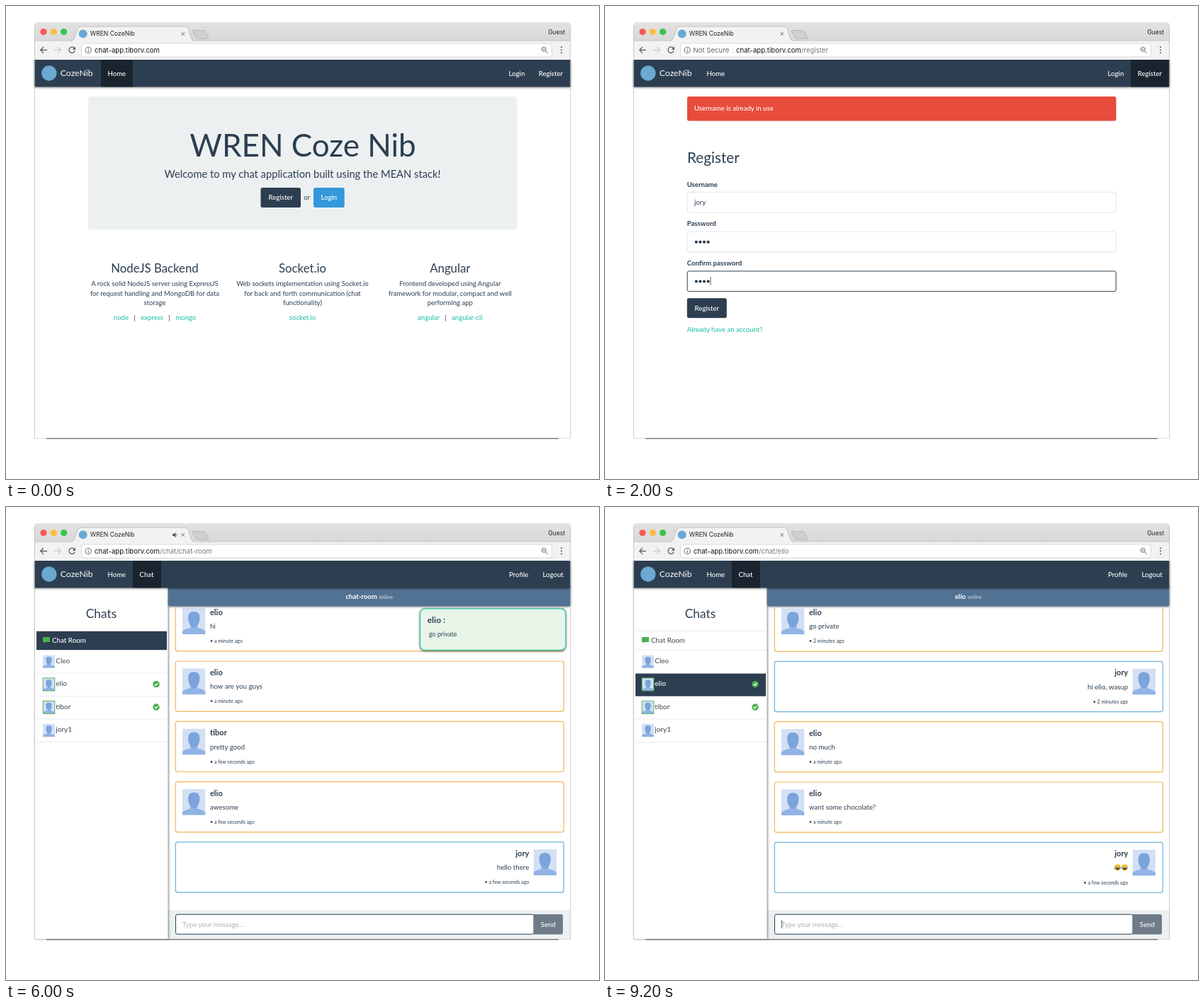
Recreate the animation shown at these times as an HTML page. Size 837 by 669 pixels, loop 10000 ms.

```html
<!DOCTYPE html>
<html lang="en">
<head>
<meta charset="utf-8">
<title>WREN CozeNib</title>
<style>
html, body { margin: 0; width: 100%; height: 100%; overflow: hidden; background: #fff; }
svg { display: block; width: 837px; height: 669px; font-family: Lato, sans-serif; }
.chrome { font-family: Inter, sans-serif; }
.shadow { filter: drop-shadow(0 1px 1.5px #0008); }
</style>
</head>
<body>
<svg id="stage" viewBox="0 0 837 669">
  <defs>
    <linearGradient id="strip" x2="0" y2="1">
      <stop stop-color="#e2e2e2"/><stop offset="1" stop-color="#d8d8d8"/>
    </linearGradient>
    <symbol id="avatar" viewBox="0 0 32 37" preserveAspectRatio="none">
      <rect width="32" height="37" fill="#d3e0f4"/>
      <path d="M0 37V33Q2 30 11 28V23H21V28Q30 30 32 33V37Z" fill="#91b3e5"/>
      <path d="M8 13Q8 5 16 5T24 13Q24 21 20.500 25Q16 30 11.500 25Q8 21 8 13Z" fill="#7ba3dc"/>
    </symbol>
    <symbol id="laugh" viewBox="-5 -5 10 10">
      <circle r="4.600" fill="#fbc83c"/>
      <path d="M-3 .5H3Q2.500 3.700 0 3.700T-3 .5Z" fill="#6b3f22"/>
      <path d="M-3-1Q-2-2.500-1-1M1-1Q2-2.500 3-1" fill="none" stroke="#6b3f22" stroke-width=".7"/>
      <circle cx="-3.800" cy="1" r="1.200" fill="#55aee8"/><circle cx="3.800" cy="1" r="1.200" fill="#55aee8"/>
    </symbol>
  </defs>
  <g id="page"></g>
</svg>
<script>
const NAVY = '#2c3e50', DARK = '#1a242f', TEAL = '#18bc9c', PALE = '#ecf0f1', GREEN = '#4caf50';
const ORANGE = '#f0b656', BLUE = '#6bb0dc', LOGO = '#6ba9d3';
const BRAND = 'CozeNib', HOST = 'chat-app.tiborv.com';
const ME = 'jory', PAL = 'elio', OTHER = 'tibor';
const SOON = 'a few seconds ago', MINUTE = 'a minute ago', TWO = '2 minutes ago';

const text = (x, y, str, size = 9.6, fill = NAVY, attrs = '') =>
  `<text x="${x}" y="${y}" font-size="${size}" fill="${fill}" ${attrs}>${str}</text>`;
const mid = 'text-anchor="middle"', end = 'text-anchor="end"', bold = 'font-weight="700"', medium = 'font-weight="500"';
const rect = (x, y, w, h, fill, r = 0, attrs = '') =>
  `<rect x="${x}" y="${y}" width="${w}" height="${h}" fill="${fill}" rx="${r}" ${attrs}/>`;
const box = (x, y, w, h, stroke, r = 3, fill = '#fff', width = 1) =>
  rect(x, y, w, h, fill, r, `stroke="${stroke}" stroke-width="${width}"`);
const dot = (x, y, r, fill) => `<circle cx="${x}" cy="${y}" r="${r}" fill="${fill}"/>`;
const line = (d, stroke, width = 1) => `<path d="${d}" fill="none" stroke="${stroke}" stroke-width="${width}"/>`;
const use = (id, x, y, w, h) => `<use href="#${id}" x="${x}" y="${y}" width="${w}" height="${h}"/>`;
const button = (x, y, w, label, fill) =>
  rect(x, y, w, 28, fill, 2.5) + text(x + w / 2, y + 17.3, label, 9.6, '#fff', mid + medium.padStart(20));

function browser({ path = '', insecure, sound }) {
  const urlX = insecure ? 185 : 125;
  return '<g class="chrome">' +
    `<path d="M40 49V28Q40 23 45 23H792Q797 23 797 28V49Z" fill="url(#strip)"/>` +
    rect(40, 49, 757, 27, '#f2f2f2') + line('M40 49H797', '#bdbdbd', .8) +
    dot(53, 36.5, 4.6, '#fc5652') + dot(67.3, 36.5, 4.6, '#fdbc40') + dot(81.6, 36.5, 4.6, '#34c748') +
    `<path d="M92 49.500Q95 49 97 44L101 33Q102.500 29 106 29H252Q256 29 257.500 33L261 44Q263 49 266 49.500Z" fill="#f2f2f2" stroke="#b5b5b5" stroke-width=".8"/>` +
    rect(93, 49, 172, 2, '#f2f2f2') +
    '<path d="M263 34.500H279Q281 34.500 282 37L286 46H271Q268 46 267 43Z" fill="#d0d0d0" stroke="#b0b0b0" stroke-width=".8"/>' +
    dot(108.7, 39.3, 6, LOGO) + text(118.7, 42.3, 'WREN ' + BRAND, 8.6, '#222') +
    line('M247.500 37.200L252 41.700M252 37.200L247.500 41.700', '#555', .9) +
    (sound ? '<path d="M235 38H237L239.500 36V43L237 41H235Z" fill="#555"/>' + line('M240.700 37.800Q242 39.500 240.700 41.200', '#777', .8) : '') +
    text(789, 40, 'Guest', 8.6, '#222', end) +
    line('M58 62.300H49M53 58L48.700 62.300L53 66.600', '#555', 1.2) +
    line('M68 62.300H77M73 58L77.300 62.300L73 66.600', '#c9c9c9', 1.2) +
    line('M96.500 59.500A4.200 4.200 0 1 0 97.200 63.500', '#555', 1.2) + '<path d="M98 57.500V61.800H93.700Z" fill="#555"/>' +
    box(106.500, 53, 664, 19, '#d3d3d3', 2.5, '#fff', .8) +
    box(112, 58.2, 8.4, 8.4, '#555', 4.2, 'none', .9) + line('M116.200 61.900V65M116.200 59.800V60.900', '#555') +
    (insecure ? text(124.5, 66, 'Not Secure', 9.6, '#666') + line('M181 57V68', '#ddd', .8) : '') +
    text(urlX, 66, `${HOST}<tspan fill="#777">${path}</tspan>`, 9.6, '#111') +
    box(756.3, 58.2, 6, 6, '#666', 3, 'none', 1) + line('M761.600 63.500L764.800 66.700M757.800 61.200H760.800', '#666') +
    [58.3, 62.3, 66.3].map(y => dot(784, y, 1, '#555')).join('') + '</g>';
}

// Each link: [label, text x, tab x, tab width]
function navbar(active, member) {
  const links = [['Home', 143.5, 134, 45]].concat(member
    ? [['Chat', 188.5, 179, 40], ['Profile', 710, 701, 47], ['Logout', 757.5, 748, 49]]
    : [['Login', 709.5, 700, 42], ['Register', 751.7, 742, 55]]);
  return rect(40, 76, 757, 38.3, NAVY, 0, 'class="shadow"') +
    links.map(([label, x, left, w]) => (label === active ? rect(left, 76, w, 38.3, DARK) : '') +
      text(x, 98.8, label, 9.6, '#fff', medium)).join('') +
    dot(60.8, 95, 10.7, LOGO) + text(76.7, 98.7, BRAND, 12.3, '#fff');
}

const frameLines = () => line('M40.400 28V611', '#bcbcbc', .8) + line('M796.700 28V611', '#bcbcbc', .8) +
  line('M40 611.300H797', '#d0d0d0', .8) + line('M57 611.800H780', '#4a4a4a', 1);

function home() {
  const bar = `<tspan fill="${NAVY}">\u00a0\u00a0\u00a0|\u00a0\u00a0\u00a0</tspan>`;
  const column = (x, title, lines, links) => text(x, 376.5, title, 16.8, NAVY, mid) +
    lines.map((s, i) => text(x, 395.8 + i * 13.7, s, 9.55, NAVY, mid)).join('') +
    text(x, 443.8, links.join(bar), 9.6, TEAL, mid);
  return rect(116, 128, 605.5, 188, PALE, 4) +
    text(419, 213.3, 'WREN Coze Nib', 44, NAVY, mid) +
    text(418.5, 242.7, 'Welcome to my chat application built using the MEAN stack!', 14.7, NAVY, mid) +
    button(359.5, 257, 56.5, 'Register', NAVY) + text(424.7, 273.5, 'or', 9.6, NAVY, mid) +
    button(434, 257, 43.7, 'Login', '#3498db') +
    column(210, 'NodeJS Backend', ['A rock solid NodeJS server using ExpressJS', 'for request handling and MongoDB for data', 'storage'], ['node', 'express', 'mongo']) +
    column(418.5, 'Socket.io', ['Web sockets implementation using Socket.io', 'for back and forth communication (chat', 'functionality)'], ['socket.io']) +
    column(626.8, 'Angular', ['Frontend developed using Angular', 'framework for modular, compact and well', 'performing app'], ['angular', 'angular-cli']);
}

function register() {
  const field = (label, y, focus) => text(115.7, y - 7.8, label, 9.6, NAVY, bold) +
    box(116.2, y, 605, 28.7, focus ? NAVY : '#dfe5ea', 2.5);
  const dots = y => [0, 1, 2, 3].map(i => dot(128.8 + i * 5.6, y, 2.1, NAVY)).join('');
  return rect(116, 128, 605.5, 34.5, '#e74c3c', 2.5) +
    text(126, 148.3, 'Username is already in use', 9.6, '#fff', medium) +
    text(116, 221.7, 'Register', 20.7) +
    field('Username', 263.3) + text(126, 280.8, ME) +
    field('Password', 319.2) + dots(333.8) +
    field('Confirm password', 375, true) + dots(389.6) + line('M149 383V395', '#333', .8) +
    button(115.8, 413.2, 56, 'Register', NAVY) +
    text(115.7, 461, 'Already have an account?', 9.6, TEAL);
}

function message([name, body, when], i, shift) {
  const y = 132.7 + i * 85.3 + shift, mine = name === ME;
  const x = mine ? 738.3 : 288, side = mine ? end : '';
  return box(239.3, y, 548, 71.2, mine ? BLUE : ORANGE, 3, '#fff', 1.2) +
    use('avatar', mine ? 744.5 : 249, y + 10.2, 32.5, 37) +
    text(x, y + 20, name, 11, NAVY, bold + ' ' + side) +
    (body ? text(x, y + 39.2, body, 9.7, NAVY, side)
      : use('laugh', 718.5, y + 30.5, 10, 10) + use('laugh', 728.5, y + 30.5, 10, 10)) +
    text(x, y + 59.3, '• ' + when, 7.1, NAVY, side);
}

function sidebar(active) {
  const contact = (name, i) => {
    const y = 203 + i * 32.4, on = name === active, online = name === PAL || name === OTHER;
    return (on ? rect(43, y + .2, 184, 32, NAVY) : line(`M43 ${y + 32.2}H227`, '#e4e8ea', .8)) +
      use('avatar', 52, y + 6.3, 17, 18.5) +
      (online ? box(52.2, y + 6.5, 16.6, 18, GREEN, 0, 'none', .9) +
        dot(212, y + 15.2, 4.7, GREEN) + line(`M209.700 ${y + 15.2}l1.700 1.700l3-3.200`, '#fff', 1.3) : '') +
      text(70.3, y + 17.8, name, 10, on ? '#fff' : '#3d4650', on ? medium : '');
  };
  const room = active === 'Chat Room';
  return rect(40.5, 114, 188, 497, '#fff', 0, 'style="filter:drop-shadow(1px 0 1.500px #0008)"') +
    text(134.5, 157, 'Chats', 17.3, NAVY, mid) +
    (room ? rect(43, 175.7, 184, 26.5, NAVY) : line('M43 175.300H227M43 202.300H227', '#e4e8ea', .8)) +
    `<path d="M52 184H62V191H56L54 193.300V191H52Z" fill="${GREEN}"/>` +
    text(65, 191.8, 'Chat Room', 9.8, room ? '#fff' : '#3d4650', room ? medium : '') +
    ['Cleo', PAL, OTHER, ME + '1'].map(contact).join('');
}

function chat({ room, title, log, shift = 0, toast, caret }) {
  return log.map((m, i) => message(m, i, shift)).join('') +
    rect(229, 114, 568, 29, '#fff') +
    rect(229, 570, 568, 41, PALE) +
    box(239.5, 576.2, 505.5, 28, NAVY, 2.5) + text(249, 593.7, 'Type your message...', 9.6, '#a9b3bc') +
    (caret ? line('M249.500 584V596', '#333', .8) : '') +
    '<path d="M745 576H783.500Q786 576 786 578.500V602Q786 604.500 783.500 604.500H745Z" fill="#6f7c88"/>' +
    text(765.3, 593.7, 'Send', 9.6, '#fff', mid + ' ' + medium) +
    sidebar(room) +
    rect(229, 110, 568, 30.3, '#527293', 3, 'class="shadow"') +
    text(513, 129.7, `${title} <tspan font-size="7.600" font-weight="400" fill="#d3dde6">online</tspan>`, 9.6, '#fff', mid + ' ' + bold) +
    (toast ? `<g class="shadow">${box(584.5, 143.7, 205.5, 58.8, '#45c4a6', 7, '#e8f5e9', 1.4)}</g>` +
      text(594.7, 164.3, PAL + ' :', 12, NAVY, bold) + text(597, 182.7, 'go private', 9) : '');
}

const roomLog = early => [
  [PAL, 'hi', early], [PAL, 'how are you guys', early], [OTHER, 'pretty good', SOON],
  [PAL, 'awesome', SOON], [ME, 'hello there', SOON]];
const privateLog = [
  [PAL, 'go private', TWO], [ME, `hi ${PAL}, wasup`, TWO], [PAL, 'no much', MINUTE],
  [PAL, 'want some chocolate?', MINUTE], [ME, '', SOON]];
const lobby = { room: 'Chat Room', title: 'chat-room' };

const scenes = [
  home() + navbar('Home') + browser({}),
  register() + navbar('Register') + browser({ path: '/register', insecure: true }),
  chat({ ...lobby, log: roomLog(SOON) }) + navbar('Chat', true) + browser({ path: '/chat/chat-room' }),
  chat({ ...lobby, log: roomLog(MINUTE), toast: true }) + navbar('Chat', true) + browser({ path: '/chat/chat-room', sound: true }),
  chat({ room: PAL, title: PAL, log: privateLog, shift: .4, caret: true }) + navbar('Chat', true) + browser({ path: '/chat/' + PAL })
].map(s => s + frameLines());

const page = document.getElementById('page');
const start = performance.now();
let shown = -1;
function tick() {
  const scene = Math.floor((performance.now() - start) / 2000) % scenes.length;
  if (scene !== shown) page.innerHTML = scenes[shown = scene];
  requestAnimationFrame(tick);
}
tick();
</script>
</body>
</html>
```
